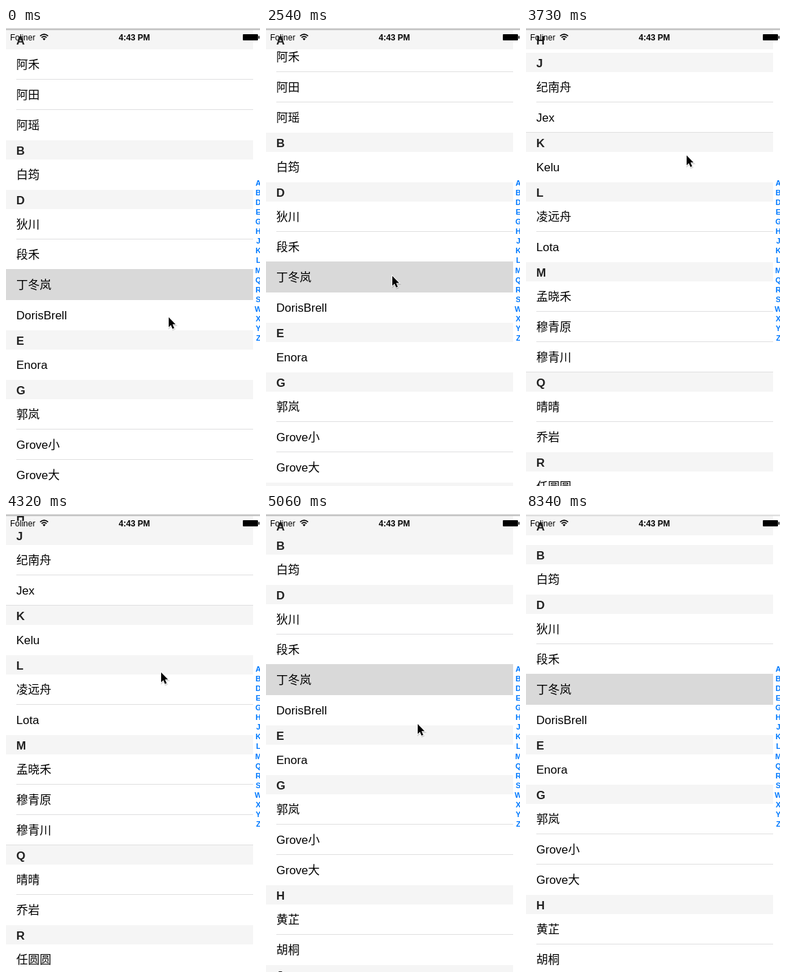
Write an HTML page that moves like this. It is 370x665 px and loops after 8440 ms.

```html
<!DOCTYPE html>
<html lang="zh-CN">
<head>
<meta charset="utf-8">
<title>Contact list</title>
<style>
html, body { margin: 0; width: 100%; height: 100%; overflow: hidden; background: #fff; }
svg { display: block; width: 370px; height: 665px; font-family: "Liberation Sans", "Noto Sans CJK SC", "Noto Sans CJK", sans-serif; }
.row { font-size: 17px; font-weight: 300; }
.head { font-size: 17px; font-weight: bold; fill: #222; }
.index { font-size: 11px; font-weight: bold; fill: #007aff; text-anchor: middle; }
.bar { font-size: 12px; }
</style>
</head>
<body>
<svg id="stage" viewBox="0 0 370 665"></svg>
<script>
const LOOP = 8440, STEP = 148.9;
const TOP = 3, HEAD = 28, ROW = 44, WIDTH = 360;
const SELECTED = '丁冬岚';
const FULL_LINE = 'JM';

const sections = [
  ['A', '阿禾', '阿田', '阿瑶'],
  ['B', '白筠'],
  ['D', '狄川', '段禾', SELECTED, 'DorisBrell'],
  ['E', 'Enora'],
  ['G', '郭岚', 'Grove小', 'Grove大'],
  ['H', '黄芷', '胡桐'],
  ['J', '纪南舟', 'Jex'],
  ['K', 'Kelu'],
  ['L', '凌远舟', 'Lota'],
  ['M', '孟晓禾', '穆青原', '穆青川'],
  ['Q', '晴晴', '乔岩'],
  ['R', '任圆圆'],
  ['S', '苏晚'],
  ['W', '温亭', '吴桥'],
  ['X', '许棠'],
  ['Y', '叶溪'],
  ['Z', '周屿']
];

// Keys: tick, then values; ticks between keys are interpolated.
const scrollKeys = [
  [0, 0], [1, 3], [4, 11], [19, 11], [20, 30], [21, 110], [22, 240], [25, 751],
  [27, 900], [28, 900], [30, 640], [32, 254], [33, 170], [34, 132], [35, 118]
];
const pointerKeys = [
  [0, 237, 420], [4, 183, 361], [16, 183, 361], [17, 184, 360], [18, 183, 361], [19, 183, 361],
  [20, 215, 355], [22, 225, 300], [25, 234, 185], [27, 232, 187], [28, 228, 195],
  [31, 221, 300], [32, 221, 309], [34, 221, 305], [37, 221, 305], [38, 219, 322],
  [39, 216, 338], [46, 216, 338], [47, 229, 312], [51, 280, 614]
];

const stage = document.getElementById('stage');

function add(parent, tag, attrs = {}, text = '') {
  const node = document.createElementNS('http://www.w3.org/2000/svg', tag);
  for (const name in attrs) node.setAttribute(name, attrs[name]);
  node.textContent = text;
  parent.appendChild(node);
  return node;
}

function rect(parent, x, y, width, height, fill) {
  return add(parent, 'rect', { x, y, width, height, fill });
}

function label(parent, x, y, cls, text) {
  return add(parent, 'text', { x, y, class: cls }, text);
}

function header(parent, y, letter) {
  rect(parent, 0, y, WIDTH, HEAD, '#f5f5f5');
  return label(parent, 15, y + 20.5, 'head', letter);
}

function buildList(parent) {
  const tops = [];
  let y = 0;
  for (const [letter, ...names] of sections) {
    tops.push(y);
    header(parent, y, letter);
    y += HEAD;
    names.forEach((name, i) => {
      const last = i === names.length - 1;
      if (name === SELECTED) rect(parent, 0, y - 1, WIDTH, ROW + 1, '#d9d9d9');
      else if (!last) rect(parent, 15, y + ROW - 1, WIDTH - 15, 1, '#e0e0e1');
      else if (FULL_LINE.includes(letter)) rect(parent, 0, y + ROW - 1, WIDTH, 1, '#e0e0e1');
      label(parent, 15, y + 28, 'row', name);
      y += ROW;
    });
  }
  return tops;
}

function buildStatus(parent) {
  label(parent, 6, 17.5, 'bar', 'Foliner');
  label(parent, 187, 17.5, 'bar', '4:43 PM').setAttribute('style', 'font-weight:bold;text-anchor:middle');
  add(parent, 'path', {
    d: 'M49.7 11.6Q55.5 6.6 61.3 11.6M51.8 13.9Q55.5 10.7 59.2 13.9',
    fill: 'none', stroke: '#000', 'stroke-width': 1.6
  });
  add(parent, 'path', { d: 'M53.3 15.6Q55.5 13.8 57.7 15.6L55.5 18Z' });
  add(parent, 'rect', { x: 345, y: 9, width: 22, height: 9, rx: 1 });
  rect(parent, 367.6, 11.5, 1.6, 4, '#000');
}

function buildPointer(parent) {
  const d = 'M0 0V14.2L3.2 11.2L5.6 16.8L8 15.8L5.6 10.3H10Z';
  const group = add(parent, 'g');
  add(group, 'path', { d, transform: 'translate(.6 1.4)', stroke: '#000', 'stroke-width': 2, opacity: .15 });
  add(group, 'path', { d, stroke: '#fff', 'stroke-width': 1.6, 'paint-order': 'stroke' });
  return group;
}

rect(stage, 0, 0, 370, 665, '#fff');
const list = add(stage, 'g');
const tops = buildList(list);
const sticky = add(stage, 'g');
const stickyText = header(sticky, 0, 'A');
sections.forEach(([letter], i) => label(stage, 367.5, 229 + i * 14.06, 'index', letter));
buildStatus(stage);
const strip = rect(stage, 0, 0, 370, 2, '#d6d6d6');
const edge = rect(stage, 0, 2, 370, 1, '#b4b4b4');
const pointer = buildPointer(stage);

function sample(keys, tick) {
  const next = keys.findIndex(key => key[0] > tick);
  if (next < 0) return keys[keys.length - 1].slice(1);
  const a = keys[next - 1], b = keys[next];
  const u = (tick - a[0]) / (b[0] - a[0]);
  return a.slice(1).map((v, i) => Math.round(v + (b[i + 1] - v) * u));
}

function render(time) {
  const tick = Math.floor((time % LOOP + 8) / STEP);
  const [scroll] = sample(scrollKeys, tick);
  list.setAttribute('transform', `translate(0 ${TOP - scroll})`);

  const next = tops.findIndex(top => top > scroll);
  const push = Math.min(0, tops[next] - scroll - HEAD);
  sticky.setAttribute('transform', `translate(0 ${TOP + push})`);
  stickyText.textContent = sections[next - 1][0];

  const [x, y] = sample(pointerKeys, tick);
  pointer.setAttribute('transform', `translate(${x} ${y})`);
  const hidden = tick >= 52 || (tick >= 42 && tick < 47);
  pointer.setAttribute('visibility', hidden ? 'hidden' : 'visible');

  const idle = tick >= 56;
  strip.setAttribute('fill', idle ? '#efefef' : '#d6d6d6');
  edge.setAttribute('fill', idle ? '#cfcfcf' : '#b4b4b4');
}

const start = performance.now();
function loop() {
  render(performance.now() - start);
  requestAnimationFrame(loop);
}
loop();
</script>
</body>
</html>
```
